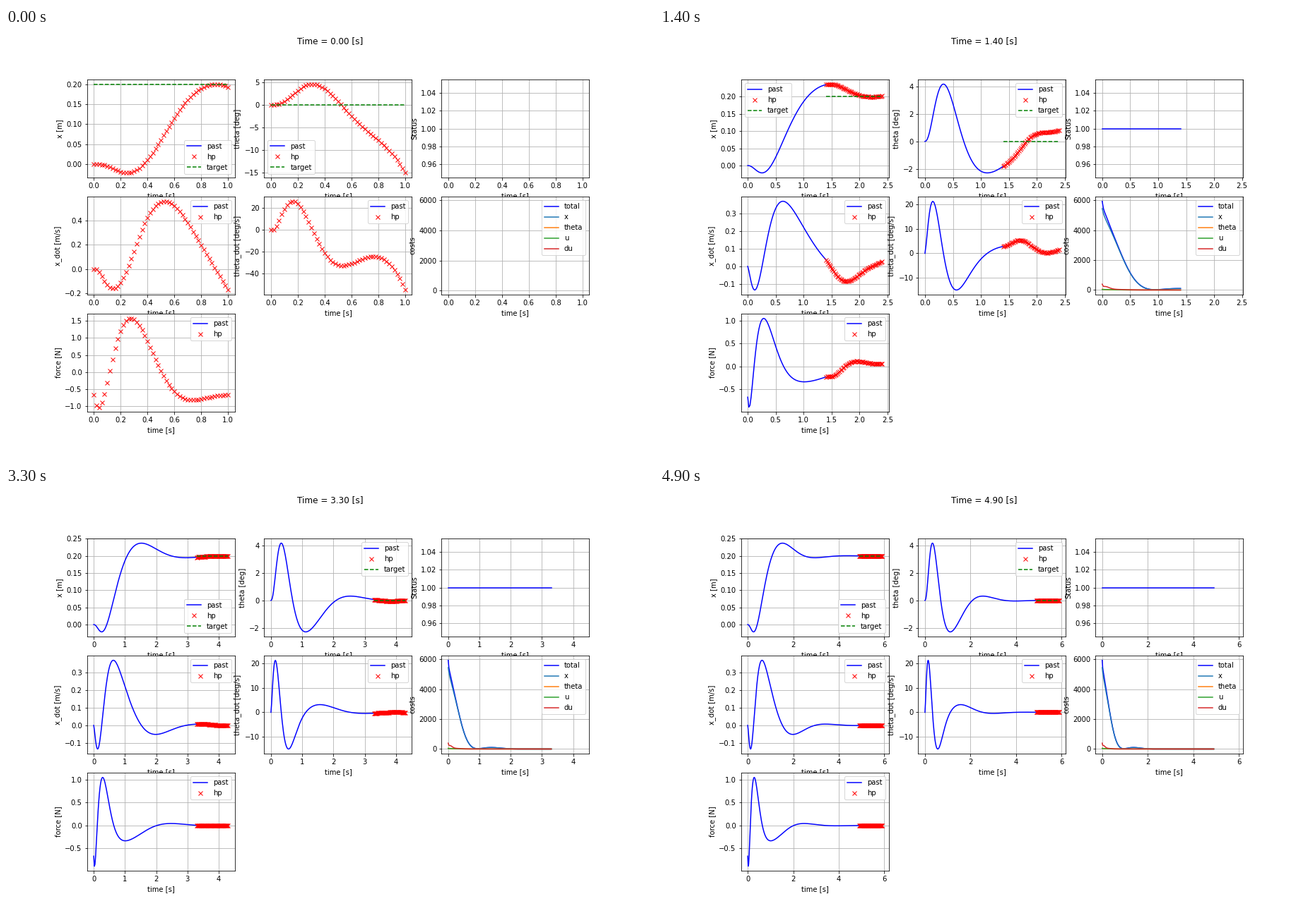
Write a matplotlib script that moves like this. It is 917 px wide and 611 px high and loops after 5000 ms.

```python
import numpy as np
import matplotlib.pyplot as plt
from matplotlib.animation import FuncAnimation

DPI = 72
DT = 0.02            # control period [s]
STEPS = 50           # prediction steps
FRAMES, STRIDE = 50, 5
X_TARGET = 0.2
W_X, W_THETA, W_U, W_DU = 5000, 100, 1, 250

CART, POLE, HALF_LENGTH, FRICTION, GRAVITY = 0.5, 0.2, 0.3, 0.1, 9.8


def step_matrix(coupling):
    """One period of the linear cart-pole: x, x_dot, theta, theta_dot, force.
    The coupling sign tells how the leaning pole pushes the cart."""
    lever = 3 / (4 * HALF_LENGTH)
    mass = CART + POLE / 4
    push = 0.75 * POLE * GRAVITY / mass
    rate = np.zeros((5, 5))
    rate[0, 1] = rate[2, 3] = 1
    rate[1] = 0, -FRICTION / mass, coupling * push, 0, 1 / mass
    rate[3] = 0, lever * FRICTION / mass, lever * (GRAVITY + push), 0, -lever / mass
    f = rate * DT
    return np.eye(5) + f + f @ f / 2 + f @ f @ f / 6


def build_controller():
    """Linear maps from the state to the optimal forces and predicted states.
    The model sees its input one period late and the coupling reversed."""
    step = step_matrix(coupling=1)
    step[4] = 0  # the held force is replaced by the next input
    n = STEPS + 1
    free = np.zeros((n, 5, 5))
    forced = np.zeros((n, 5, n))
    free[0] = np.eye(5)
    for k in range(STEPS):
        free[k + 1] = step @ free[k]
        forced[k + 1] = step @ forced[k]
        forced[k + 1, 4, k] += 1

    diff = np.eye(n) - np.eye(n, k=-1)
    hess = W_U * np.eye(n) + W_DU * diff.T @ diff
    grad = np.zeros((n, 5))
    grad[:, 4] = -W_DU * diff[0]
    for weight, row in ((W_X, 0), (W_THETA, 2)):
        hess += weight * forced[:, row].T @ forced[:, row]
        grad += weight * forced[:, row].T @ free[:, row]
    gain = -np.linalg.solve(hess, grad)
    return gain, free + forced @ gain


def simulate(gain, count):
    """Closed loop; the last state entry is the force of the previous period."""
    plant = step_matrix(coupling=-1)
    states = np.zeros((count, 5))
    states[0, 0] = -X_TARGET
    for k in range(count - 1):
        now = states[k].copy()
        now[4] = gain[0] @ states[k]
        states[k + 1] = plant @ now
    return states


def cost(weight, values):
    return weight * (values ** 2).sum(axis=1)


time = np.arange((FRAMES - 1) * STRIDE + 1) * DT
gain, predict = build_controller()
state = simulate(gain, len(time))
plan_u = state @ gain.T
plan = np.einsum("kij,tj->tik", predict, state)
plan_du = np.diff(plan_u, axis=1, prepend=state[:, 4:])

costs = {"x": cost(W_X, plan[:, 0, 1:]), "theta": cost(W_THETA, plan[:, 2, 1:]),
         "u": cost(W_U, plan_u), "du": cost(W_DU, plan_du)}
costs = {"total": sum(costs.values()), **costs}
cost_colors = {"total": "b", "x": "C0", "theta": "C1", "u": "C2", "du": "C3"}

# ylabel, grid cell, prediction, target
panels = [
    ("x [m]", 1, plan[:, 0] + X_TARGET, X_TARGET),
    ("theta [deg]", 2, np.degrees(plan[:, 2]), 0),
    ("x_dot [m/s]", 4, plan[:, 1], None),
    ("theta_dot [deg/s]", 5, np.degrees(plan[:, 3]), None),
    ("force [N]", 7, plan_u, None),
]

# The small excess keeps the pixel size from rounding down
fig = plt.figure(figsize=(917.001 / DPI, 611.001 / DPI), dpi=DPI)
title = fig.suptitle("")


def add_axes(cell, ylabel):
    ax = fig.add_subplot(3, 3, cell)
    ax.set_xlabel("time [s]")
    ax.set_ylabel(ylabel)
    ax.grid(True)
    return ax


past_lines, plan_lines, target_lines = [], [], []
for ylabel, cell, ahead, target in panels:
    ax = add_axes(cell, ylabel)
    past_lines.append((ax.plot([], [], "b-", label="past")[0], ahead[:, 0]))
    plan_lines.append((ax.plot([], [], "rx", label="hp")[0], ahead))
    if target is not None:
        target_lines.append((ax.plot([], [], "g--", label="target")[0], target))
    ax.legend()

ax = add_axes(3, "Status")
past_lines.append((ax.plot([], [], "b-")[0], np.ones_like(time)))

ax = add_axes(6, "costs")
for name, values in costs.items():
    line, = ax.plot([], [], color=cost_colors[name], label=name)
    past_lines.append((line, values))
ax.legend()


def update(frame):
    n = frame * STRIDE
    now = n * DT
    ahead_time = now + np.arange(STEPS + 1) * DT
    title.set_text(f"Time = {now:.2f} [s]")
    for line, values in past_lines:
        line.set_data(time[:n + 1], values[:n + 1])
    for line, values in plan_lines:
        line.set_data(ahead_time, values[n])
    for line, value in target_lines:
        line.set_data(ahead_time, np.full(STEPS + 1, value))
    end = ahead_time[-1]
    for ax in fig.axes:
        ax.set_xlim(-0.05 * end, 1.05 * end)
        ax.relim()
        ax.autoscale_view(scalex=False)
    return []


animation = FuncAnimation(fig, update, frames=FRAMES, interval=100,
                          init_func=lambda: [], repeat=True, repeat_delay=0)
plt.show()
```
